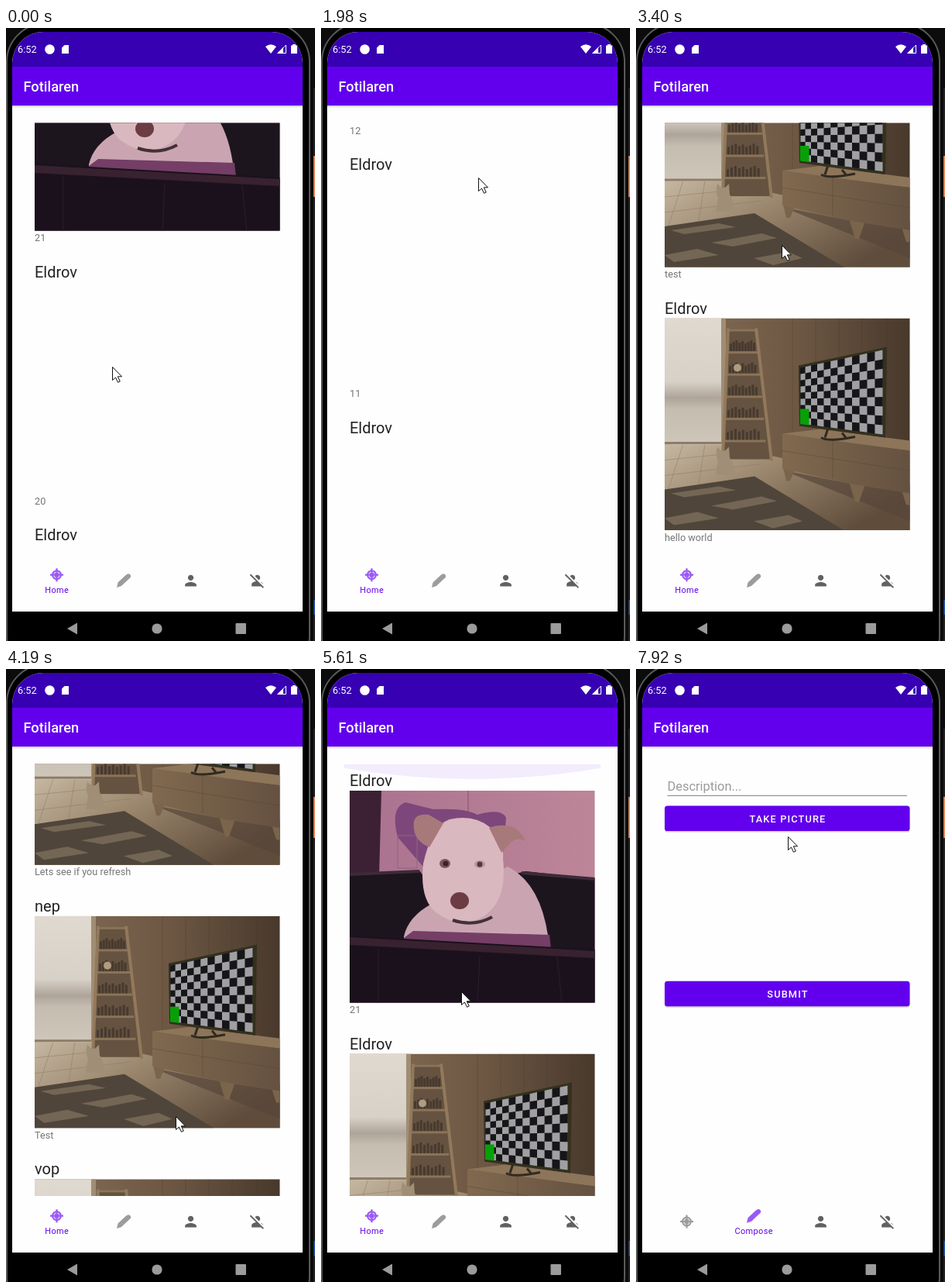
An HTML page that plays this animation: 399 px wide and 791 px high, repeating every 8000 ms.

```html
<!DOCTYPE html>
<html lang="en">
<head>
<meta charset="utf-8">
<title>Photo feed</title>
<style>
html, body { margin: 0; width: 100%; height: 100%; overflow: hidden; background: #000; }
svg { display: block; width: 100vw; height: 100vh; font-family: Roboto, sans-serif; }
.name { font-size: 20px; fill: #212121; }
.note { font-size: 12.7px; fill: #757575; }
.label { font-size: 10.95px; letter-spacing: .37px; fill: #6200ee; text-anchor: middle; }
.button { font-size: 12.77px; font-weight: 500; letter-spacing: 1.14px; fill: #fff; text-anchor: middle; }
.blank .room { display: none; }
.tab { color: #9c9c9c; }
.on { color: #9a5af5; }
.tab .label { display: none; }
.on .label { display: inline; }
</style>
</head>
<body>
<svg viewBox="0 0 399 791" preserveAspectRatio="none">
<defs>
  <clipPath id="listClip"><rect x="8" y="122.500" width="375" height="557.500"/></clipPath>
  <clipPath id="photoClip"><rect width="316.500" height="273.500"/></clipPath>
  <linearGradient id="wall"><stop offset=".2" stop-color="#7d6751"/><stop offset=".55" stop-color="#6d5743"/><stop offset="1" stop-color="#48392c"/></linearGradient>
  <linearGradient id="sky" x2="0" y2="1"><stop stop-color="#dfd9cf"/><stop offset=".5" stop-color="#d8d1c7"/><stop offset=".63" stop-color="#aea499"/><stop offset=".72" stop-color="#c6bdb1"/><stop offset="1" stop-color="#cfc6ba"/></linearGradient>
  <linearGradient id="ground" x2="1" y2=".6"><stop stop-color="#c6b8a2"/><stop offset=".45" stop-color="#9a866d"/><stop offset="1" stop-color="#5f4c3b"/></linearGradient>
  <linearGradient id="front"><stop stop-color="#80694f"/><stop offset="1" stop-color="#655140"/></linearGradient>
  <linearGradient id="pinkWall"><stop stop-color="#a9718f"/><stop offset="1" stop-color="#bd8698"/></linearGradient>
  <linearGradient id="shade" x2="0" y2="1"><stop stop-color="#000" stop-opacity=".22"/><stop offset="1" stop-color="#000" stop-opacity="0"/></linearGradient>

  <g id="room" clip-path="url(#photoClip)">
    <rect width="317" height="274" fill="url(#wall)"/>
    <path d="M165 0V150M195 0V60M225 0V50M255 0V45M287 0V150" stroke="#4a3929" stroke-opacity=".3"/>
    <path d="M0 163L74 160 140 178 317 215V274H0Z" fill="url(#ground)"/>
    <path d="M0 183L110 172M0 203L125 188M24 162L5 220M52 162L44 214" stroke="#8b7860" stroke-opacity=".5"/>
    <rect width="74" height="163" fill="url(#sky)"/>
    <path d="M0 161H78" stroke="#8d7c66" stroke-width="3"/>
    <rect x="73" width="6" height="162" fill="#a08d74"/>
    <path d="M80 14H118L137 182H75Z" fill="#655240"/>
    <g id="shelves"></g>
    <path d="M82 13L75 180M118 13L138 184" stroke="#92795c" stroke-width="4"/>
    <circle cx="94" cy="64" r="5" fill="#b09c82"/>
    <path d="M0 221L116 204 232 274H0Z" fill="#50453a"/>
    <path d="M8 226L70 217 92 222 25 231ZM60 242L125 230 145 236 88 247ZM0 258L42 250 70 258 12 267ZM115 262L160 254 178 262 140 271Z" fill="#93816b" opacity=".55"/>
    <path d="M68 166l5 5h5l5-5 1 14q5 6 5 17l8 4q-9 3-20 1h-11l3-18q-4-7-1-18z" fill="#a08e76"/>
    <path d="M152 196L242 214 317 226V262Z" fill="#58473a" opacity=".7"/>
    <path d="M153 192l4 18h5l7-16M238 211l8 26h5l8-23M306 222l6 19h5v-20" fill="#7a644c"/>
    <path d="M152 149L200 143 317 158V171L246 163Z" fill="#8d755a"/>
    <path d="M152 149L317 171V226L242 214 152 194Z" fill="url(#front)"/>
    <path d="M217 158V207M152 171L317 197" stroke="#544231" stroke-opacity=".4"/>
    <path d="M202 154Q212 160 246 153M211 142L207 154M229 148L234 154" stroke="#302b20" stroke-width="3" fill="none"/>
    <path d="M173 61L287 37 285 154 174 139Z" fill="#33301f"/>
    <path d="M175 64L282 41 280 150 176 136Z" fill="#161618"/>
    <path id="checks" fill="#a0a0a4"/>
    <path d="M175 117H186.500V138L175 136.500Z" fill="#07a007"/>
  </g>

  <g id="dog" clip-path="url(#photoClip)">
    <rect width="317" height="274" fill="url(#pinkWall)"/>
    <path d="M0 0H41L38 112H0Z" fill="#3b2133"/>
    <path d="M153 0V30" stroke="#83546e"/>
    <path d="M62 60Q52 22 72 15L108 24Q150 22 165 31Q196 22 202 35L198 82 100 104Z" fill="#7d477b"/>
    <rect x="62" y="58" width="25" height="42" fill="none" stroke="#96627f"/>
    <path d="M0 108L90 103 104 122 210 108 228 104 317 114V274H0Z" fill="#1d151e"/>
    <path d="M0 108L90 104M222 106L317 114" stroke="#3c2b39" stroke-width="4"/>
    <path d="M70 188Q76 162 106 146L204 98Q251 122 258 204H70Z" fill="#caa5b1"/>
    <path d="M95 94Q106 45 129 37Q160 30 181 47Q200 60 198 88Q204 142 173 162Q143 180 111 157Q90 139 95 94Z" fill="#dab8bf"/>
    <path d="M103 73Q80 64 83 39Q86 29 102 31L121 42ZM180 48Q194 42 211 47Q223 54 227 65Q216 59 208 67L196 80Z" fill="#a8797b"/>
    <path d="M133 167Q160 176 184 163" stroke="#433039" stroke-width="4" fill="none"/>
    <ellipse cx="123" cy="94" rx="7" ry="6" fill="#80565f"/><circle cx="124" cy="94" r="3.500" fill="#38252e"/>
    <ellipse cx="168" cy="95" rx="7" ry="5" fill="#b996a1"/><circle cx="168" cy="95" r="3.500" fill="#4d3a47"/>
    <ellipse cx="142" cy="142" rx="12" ry="11" fill="#6d3b43"/>
    <path d="M70 190L82 181 258 186 260 204H70Z" fill="#743e66"/>
    <path d="M0 187L317 205V274H0Z" fill="#1b111c"/>
    <path d="M0 189L317 207V216L0 199Z" fill="#38222f"/>
    <path d="M168 213L165 274M37 204V274M268 214L274 274" stroke="#2c1d2b"/>
  </g>
</defs>

<!-- Device body -->
<rect width="399" height="791" fill="#0c0c0c"/>
<rect x="1" y="-6" width="391" height="840" rx="50" fill="#000" stroke="#5a5a5a" stroke-width="2"/>
<path d="M398 77V791" stroke="#242424" stroke-width="2"/>
<path d="M398.500 165V218" stroke="#e08358" stroke-width="3"/>
<path d="M398.500 738V757" stroke="#2459b5" stroke-width="2"/>
<path d="M8 753V45A40 40 0 0 1 48 5H343A40 40 0 0 1 383 45V753Z" fill="#fefefe"/>
<path d="M8 50V45A40 40 0 0 1 48 5H343A40 40 0 0 1 383 45V50Z" fill="#3700b3"/>
<rect x="8" y="100" width="375" height="3" fill="url(#shade)"/>
<rect x="8" y="50" width="375" height="50" fill="#6200ee"/>
<text x="22.500" y="82" font-size="18.250" font-weight="500" fill="#fff">Fotilaren</text>
<g fill="#fff">
  <text x="15" y="32" font-size="12.800">6:52</text>
  <circle cx="56.500" cy="27.500" r="6.300"/>
  <path d="M75.500 22H81V33H72V25.500Z"/>
  <path d="M335 24Q342 18.500 349 24L342 33Z"/>
  <path d="M361.500 22V32.500H351Z" fill="none" stroke="#fff"/>
  <path d="M358 25V33H350Z"/>
  <path d="M370 21H374V22.500H376V33H368V22.500H370Z"/>
</g>

<!-- Feed screen -->
<g id="feed" clip-path="url(#listClip)">
  <g id="list"></g>
  <path id="glow" d="M30 123H361V128Q195 156 30 128Z" fill="#6200ee"/>
</g>

<!-- Compose screen -->
<g id="form">
  <text x="40.500" y="156.500" font-size="16.400" fill="#9b9b9b">Description...</text>
  <path d="M40.500 163.500H350" stroke="#858585"/>
  <g id="buttons"></g>
</g>

<!-- Tabs -->
<circle id="ripple" cx="152" cy="713" r="25" fill="#6200ee" opacity=".1"/>
<g id="home" class="tab">
  <g class="icon" stroke="currentColor" fill="none" stroke-width="2.200">
    <circle r="5.400"/><circle r="3.300" fill="currentColor" stroke="none"/>
    <path d="M0-8.500V-3M0 8.500V3M-8.500 0H-3M8.500 0H3"/>
  </g>
  <text class="label" x="65.700" y="729">Home</text>
</g>
<g id="compose" class="tab">
  <path class="icon" fill="currentColor" d="M-9 9L-7.500 2.500 1.500-6 6-1.500-3 7ZM1.500-6Q5.500-10.500 8.300-7.800T6-1.500Z"/>
  <text class="label" x="152.200" y="729">Compose</text>
</g>
<g fill="#616161">
  <path transform="translate(227.500 702) scale(.92)" d="M12 12c2.210 0 4-1.790 4-4s-1.790-4-4-4-4 1.790-4 4 1.790 4 4 4zm0 2c-2.670 0-8 1.340-8 4v2h16v-2c0-2.660-5.330-4-8-4z"/>
  <path transform="translate(313.500 702) scale(.92)" d="M8.650 5.820C9.360 4.720 10.600 4 12 4c2.210 0 4 1.790 4 4 0 1.400-.72 2.640-1.820 3.350zM20 17.170c-.02-1.100-.63-2.110-1.610-2.620-.54-.28-1.130-.54-1.770-.76zM2.810 2.810L1.390 4.220l8.890 8.890c-1.810.23-3.390.79-4.670 1.450C4.610 15.070 4 16.100 4 17.220V20h13.170l2.610 2.610 1.410-1.420z"/>
</g>
<g fill="#9b9b9b">
  <path d="M79 775L92 767.500V782.500Z"/><circle cx="195" cy="775" r="6.600"/><rect x="296.500" y="768" width="13.500" height="14" rx="1"/>
</g>
<path id="cursor" d="M0 0V17L4 13.500 7 19.800 9.800 18.500 6.800 12.300H12Z" fill="#fff" stroke="#111"/>
</svg>
<script>
const $ = id => document.getElementById(id);
const PITCH = 339.5, POSTS = 20, END = 6233;
const range = (n, make) => Array.from({ length: n }, (_, i) => make(i));

// Television checkerboard, seen in perspective
const COLS = 12, ROWS = 9;
function corner(i, j) {
  const u = (i / COLS) ** 1.15, top = 64 - 23 * u, bottom = 136 + 14 * u;
  return `${175.5 + 106 * u} ${top + (bottom - top) * j / ROWS}`;
}
let checks = '';
for (let i = 0; i < COLS; i++)
  for (let j = (i + 1) % 2; j < ROWS; j += 2)
    checks += `M${corner(i, j)}L${corner(i + 1, j)} ${corner(i + 1, j + 1)} ${corner(i, j + 1)}Z`;
$('checks').setAttribute('d', checks);

// Ladder shelves widen towards the floor
$('shelves').innerHTML = range(6, row => {
  const y = 15 + row * 28.6, left = 81 - row, width = 38 + row * 3.3;
  const books = row ? range(9, i => {
    const h = 11 + (i * 7 + row * 5) % 5;
    return `<rect x="${left + 4 + i * width / 11}" y="${y - h}" width="3" height="${h}" fill="#473a2f"/>`;
  }).join('') : '';
  return `${books}<rect x="${left}" y="${y - 1}" width="${width}" height="3" fill="#8b7358"/>`;
}).join('');

$('buttons').innerHTML = ['TAKE PICTURE', 'SUBMIT'].map((text, i) => {
  const y = 176.5 + i * 226.3, box = `x="37" width="316.5" height="32.5" rx="3.6"`;
  return `<rect ${box} y="${y + 1.5}" opacity=".2"/><rect ${box} y="${y}" fill="#6200ee"/>
    <text class="button" x="196" y="${y + 21.5}">${text}</text>`;
}).join('');

// Posts, newest first: numbered ones, then the early trials
const trials = ['Lets see if you refresh', 'Test', 'hi', 'Test', 'test', 'hello world'];
const names = { 15: 'nep', 16: 'vop' };
$('list').innerHTML = range(POSTS, i => `<g transform="translate(37 ${157 + i * PITCH})">
  <text class="name" y="-6">${names[i] || 'Eldrov'}</text>
  <use href="#${i ? 'room' : 'dog'}" class="${i ? 'room' : ''}"/>
  <text class="note" y="287">${trials[i - POSTS + trials.length] || 21 - i}</text></g>`).join('');

// Key points: [time, value...]
const scroll = [[0, 169], [1994, 3363], [3130, END], [3700, END], [4231, 4932], [4920, 1280], [5340, 0]];
const pointer = [[3135, 203, 193], [3407, 188, 280], [3700, 190, 250], [4231, 219, 577], [4370, 225, 743],
  [5060, 190, 200], [5620, 181, 416], [7100, 148, 712], [7350, 148, 712], [7920, 196, 216]];

function at(track, t) {
  const n = track.findIndex(k => k[0] > t);
  if (n < 0) return track[track.length - 1].slice(1);
  const a = track[n - 1], b = track[n], f = (t - a[0]) / (b[0] - a[0]);
  return a.slice(1).map((v, i) => v + (b[i + 1] - v) * f);
}

// Flicking the list swings the pointer up and down
function pointerAt(t) {
  const swing = Math.cos(2 * Math.PI * t / 570);
  return t < 3135 ? [170 - 33 * swing, 315 + 122 * swing] : at(pointer, t);
}

// The screen refreshes about seven times a second, in uneven batches of eight
const batches = [140, 1300, 2410, 3550, 4640, 5760, 6830, 7920];
function tick(t) {
  if (t < batches[0]) return 0;
  const n = batches.findIndex(b => b > t);
  if (n < 0) return 7920;
  const start = batches[n - 1], step = (batches[n] - start) / 8;
  return start + step * Math.floor((t - start) / step + .35);
}

// Overscroll glow swells around a peak time
const swell = (t, peak, width) => .07 * Math.max(0, Math.min(1, 2 - 2 * Math.abs(t - peak) / width));

const show = (id, on) => $(id).style.display = on ? '' : 'none';
function tab(id, x, on) {
  $(id).setAttribute('class', on ? 'tab on' : 'tab');
  $(id).querySelector('.icon').setAttribute('transform', `translate(${x} ${on ? 705.7 : 713})`);
}

function draw() {
  const t = tick(performance.now() % 8000), composing = t > 7240, atEnd = t < 4000;
  $('list').setAttribute('transform', `translate(0 ${-at(scroll, t)[0]})`);
  $('list').setAttribute('class', t < 2100 ? 'blank' : '');
  $('glow').setAttribute('opacity', atEnd ? swell(t, 3130, 260) : swell(t, 5700, 500));
  $('glow').setAttribute('transform', atEnd ? 'translate(0 803) scale(1 -1)' : '');
  show('feed', !composing);
  show('form', composing);
  show('ripple', t > 7100 && t < 7850);
  tab('home', 65.5, !composing);
  tab('compose', 152, composing);
  show('cursor', t < 4450 || t > 5050);
  $('cursor').setAttribute('transform', `translate(${pointerAt(t).map(v => Math.round(v) + .5)})`);
  requestAnimationFrame(draw);
}
draw();
</script>
</body>
</html>
```
